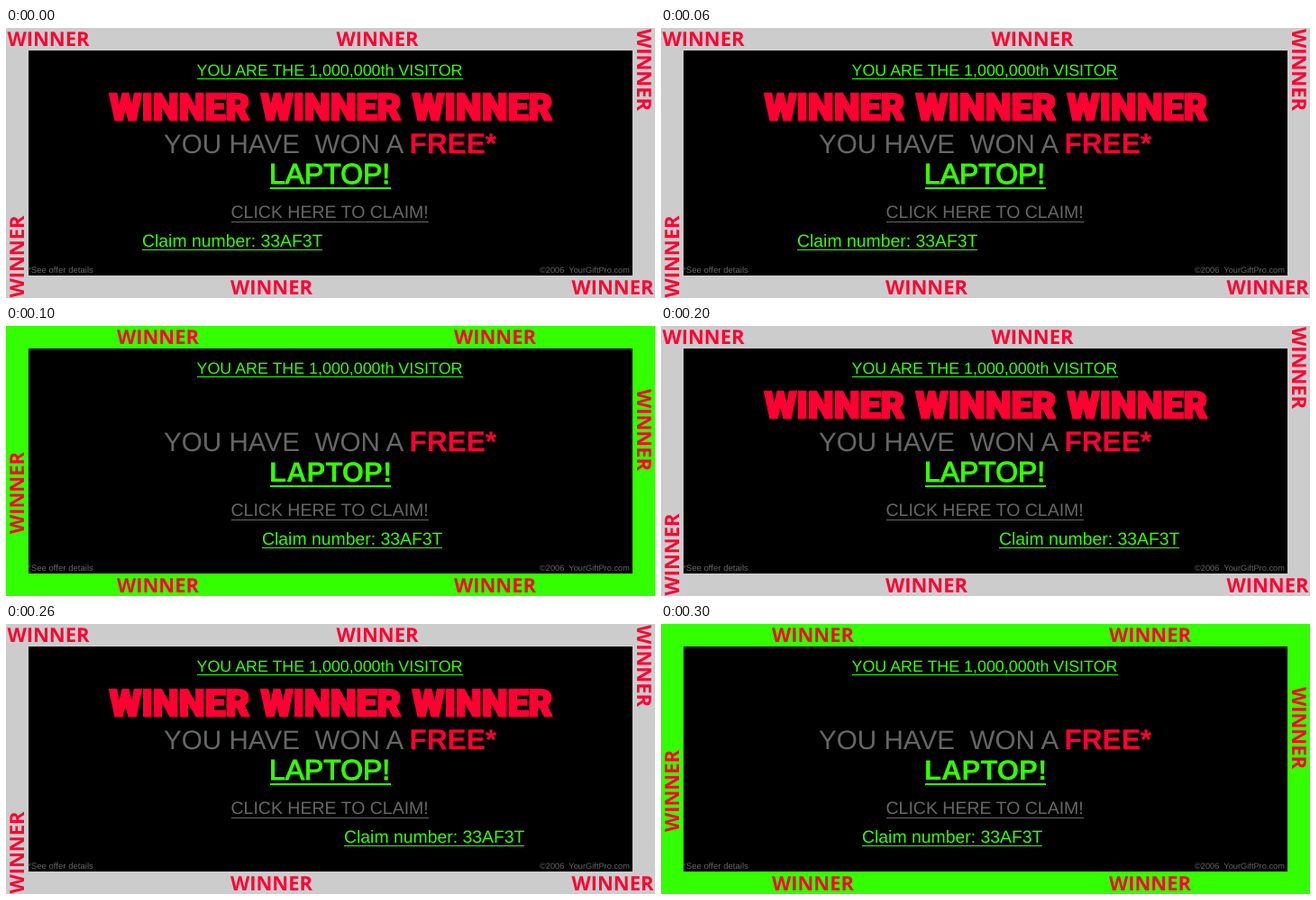
Recreate the animation shown at these times as an HTML page. Size 720 by 300 pixels, loop 400 ms.

```html
<!DOCTYPE html>
<html lang="en">
<head>
<meta charset="utf-8">
<title>Winner banner</title>
<style>
  html, body { margin: 0; width: 100%; height: 100%; overflow: hidden; background: #000; }
  svg { display: block; width: 720px; height: 300px; }
  text { font-family: "Liberation Sans", Arial, sans-serif; white-space: pre; text-rendering: geometricPrecision; }
  .green { fill: #3f0; }
  .gray { fill: #666; }
  .red { fill: #f03; }
  .bold { font-weight: 700; }
  .edge text { font: 700 22px "Open Sans", sans-serif; text-anchor: middle; fill: #f03; }
  .headline text {
    font: 900 41px Roboto, sans-serif; text-anchor: middle;
    fill: #f03; stroke: #f03; stroke-width: 2.4;
  }
</style>
</head>
<body>
<svg viewBox="0 0 720 300">
  <rect id="border" width="720" height="300"/>
  <rect x="25" y="25" width="670" height="250"/>
  <g id="edgeA" class="edge"></g>
  <g id="edgeB" class="edge"></g>

  <g class="green">
    <text x="211.5" y="53" font-size="17.85">YOU ARE THE 1,000,000th VISITOR</text>
    <rect x="212" y="56" width="295" height="1"/>
  </g>

  <g id="headline" class="headline">
    <text x="192.5" y="102">WINNER</text>
    <text x="360.5" y="102">WINNER</text>
    <text x="528.5" y="102">WINNER</text>
  </g>

  <text class="gray" x="175" y="139" font-size="29.65">YOU HAVE  WON A</text>
  <text class="red bold" x="447.5" y="139" font-size="31.6">FREE*</text>

  <g class="green">
    <text id="prizeLight" x="292" y="173" font-size="31.9" stroke="#3f0" stroke-width="1.1">LAPTOP!</text>
    <text id="prizeBold" class="bold" x="292" y="173" font-size="31.2">LAPTOP!</text>
    <rect x="293" y="177" width="134" height="2"/>
  </g>

  <g class="gray">
    <text x="249.5" y="211" font-size="19.5">CLICK HERE TO CLAIM!</text>
    <rect x="250" y="215" width="219" height="1"/>
    <text x="24" y="272" font-size="9.6">*See offer details</text>
    <text x="592" y="272" font-size="9.25">©2006  YourGiftPro.com</text>
  </g>

  <g id="claim" class="green">
    <text y="242.5" font-size="19.4">Claim number: 33AF3T</text>
    <rect y="246" width="200" height="1"/>
  </g>
</svg>
<script>
  const STEP = 100;
  const CLAIM_X = [151, 284, 375, 223];
  const byId = id => document.getElementById(id);
  const show = (id, visible) => byId(id).setAttribute("visibility", visible ? "visible" : "hidden");

  // Each label is the middle of its baseline plus a rotation.
  function addLabels(id, labels) {
    byId(id).innerHTML = labels.map(([x, y, angle = 0]) =>
      `<text transform="translate(${x} ${y}) rotate(${angle})">WINNER</text>`).join("");
  }
  addLabels("edgeA", [[47, 20], [412, 20], [294.5, 295.5], [673, 295.5],
                      [700, 46.5, 90], [20, 254, -90]]);
  addLabels("edgeB", [[168.5, 20], [542.5, 20], [168.5, 295.5], [542.5, 295.5],
                      [700, 115.5, 90], [20, 185.5, -90]]);

  function draw() {
    const step = Math.floor(performance.now() / STEP) % CLAIM_X.length;
    const lit = step % 2 === 0;
    byId("border").setAttribute("fill", lit ? "#ccc" : "#3f0");
    show("edgeA", lit);
    show("edgeB", !lit);
    show("headline", lit);
    show("prizeLight", lit);
    show("prizeBold", !lit);
    byId("claim").setAttribute("transform", `translate(${CLAIM_X[step]} 0)`);
    requestAnimationFrame(draw);
  }
  draw();
</script>
</body>
</html>
```
